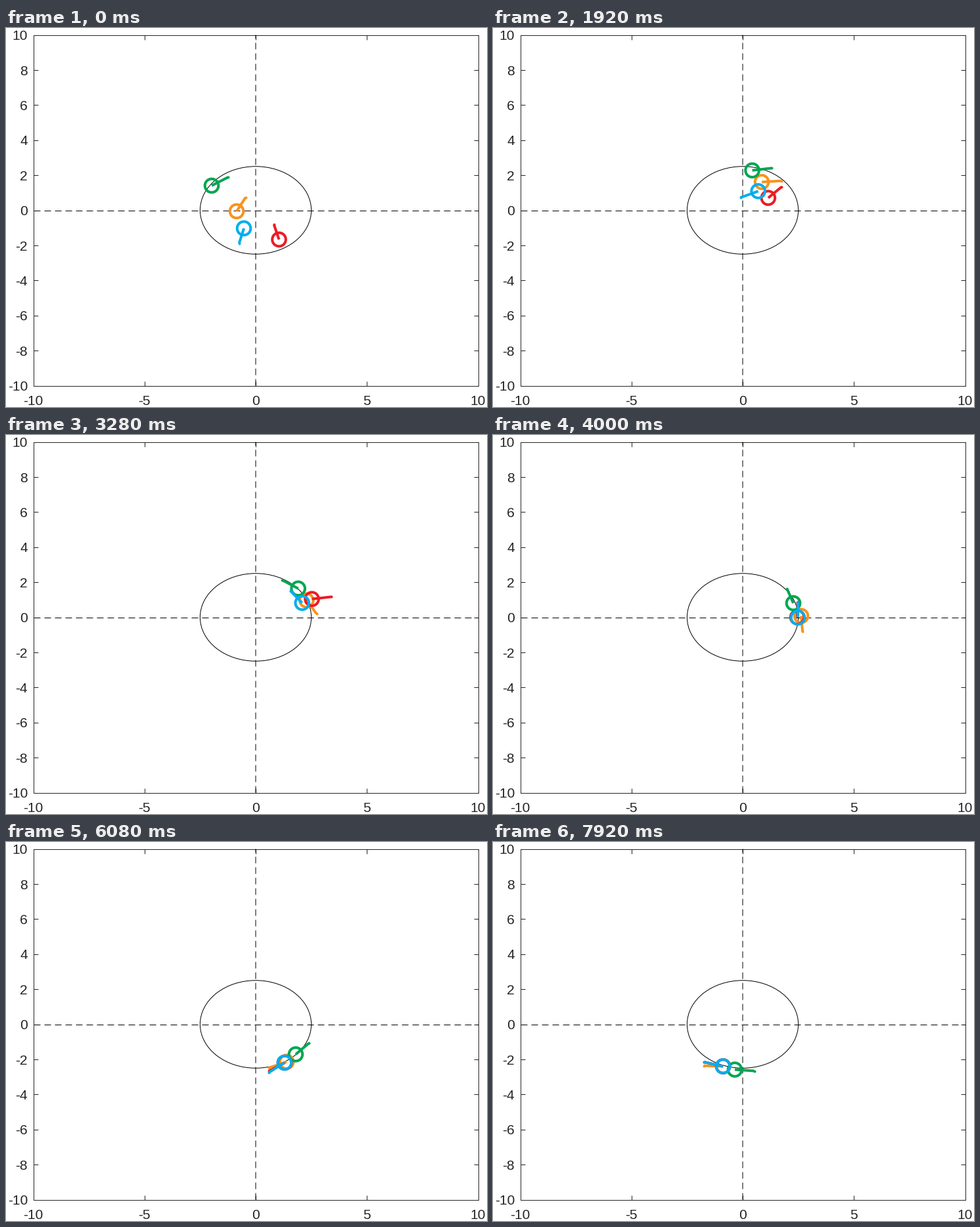
These frames come from a looping animation (732x577 px, 8000 ms). A matplotlib script:

```python
import numpy as np
import matplotlib.pyplot as plt
from matplotlib.animation import FuncAnimation
from matplotlib.patches import Circle, Ellipse, Rectangle

W, H, DPI = 732, 577, 64
PX = 72 / DPI  # points per pixel
FRAMES, INTERVAL = 100, 80
CX, CY, SX, SY = 380, 277.5, 33.85, 26.7  # plot origin and pixels per unit
INK = "#262626"
ARM = 0.88
TIMES = np.array([0, 1.2, 2.64, 4.0, 5.2, 6.96, 7.92])


def spline(times, values, t):
    """Cubic Hermite curve through the given points."""
    times, values = np.asarray(times, float), np.asarray(values, float)
    slopes = np.gradient(values, times, axis=0, edge_order=2)
    i = int(np.clip(np.searchsorted(times, t, side="right") - 1, 0, len(times) - 2))
    h = times[i + 1] - times[i]
    u = (t - times[i]) / h
    return ((2 * u**3 - 3 * u**2 + 1) * values[i]
            + (u**3 - 2 * u**2 + u) * h * slopes[i]
            + (3 * u**2 - 2 * u**3) * values[i + 1]
            + (u**3 - u**2) * h * slopes[i + 1])


def half_turn(t, start, length=0.5):
    u = np.clip((t - start) / length, 0, 1)
    return 180 * u * u * (3 - 2 * u)


class Robot:
    def __init__(self, ax, color, path, course, reverse, extra=None):
        """course: direction of travel in degrees; reverse: added turn over time."""
        keys = list(zip(TIMES, path)) + ([extra] if extra else [])
        keys.sort(key=lambda k: k[0])
        self.times = [k[0] for k in keys]
        self.path = [k[1] for k in keys]
        self.course, self.reverse = course, reverse
        self.body = Circle((0, 0), 10.3, fill=False, ec=color, lw=4 * PX, zorder=5)
        ax.add_patch(self.body)
        self.arm, = ax.plot([], [], color=color, lw=4 * PX, solid_capstyle="butt",
                            marker="o", ms=4 * PX, mew=0, markevery=[1], zorder=5)

    def move(self, t):
        x, y = spline(self.times, self.path, t)
        a = np.radians(spline(TIMES, self.course, t) + self.reverse(t))
        self.body.center = x, y
        self.arm.set_data([x, x + ARM * SX * np.cos(a)],
                          [y, y - ARM * SY * np.sin(a)])
        return self.body, self.arm


fig = plt.figure(figsize=(W / DPI, H / DPI), dpi=DPI, facecolor="white")
ax = fig.add_axes([0, 0, 1, 1])
ax.set(xlim=(0, W), ylim=(H, 0))
ax.axis("off")

left, right = CX - 10 * SX, CX + 10 * SX
top, bottom = CY - 10 * SY, CY + 10 * SY


def rule(xs, ys, **style):
    ax.plot(xs, ys, lw=PX, solid_capstyle="butt", dash_capstyle="butt",
            **{"color": INK, "zorder": 2, **style})


def label(x, y, value, align):
    ax.text(x, y, str(value), ha=align, va="baseline", color=INK,
            fontsize=21 * PX, family="Liberation Sans")


ax.add_patch(Rectangle((left, top), right - left, bottom - top,
                       fill=False, ec=INK, lw=PX, zorder=2))
for v in range(-10, 11, 5):
    x = CX + v * SX
    rule([x, x], [bottom, bottom - 7])
    rule([x, x], [top, top + 7])
    label(x, 574, v, "center")
for v in range(-10, 11, 2):
    y = CY - v * SY
    rule([left, left + 7], [y, y])
    rule([right, right - 7], [y, y])
    label(33, y + 7.7, v, "right")

dashes = (0, (10, 6))
rule([left, right], [CY, CY], color="black", ls=dashes)
rule([CX, CX], [bottom, top], color="black", ls=dashes, snap=False)
ax.add_patch(Ellipse((CX, CY), 5 * SX, 5 * SY, fill=False, ec="black", lw=PX, zorder=3))

robots = [
    Robot(ax, "#F7931D",
          [(351, 279), (379.5, 243), (438.5, 237), (469, 275.5),
           (455, 315), (391, 344.5), (350.5, 341.5)],
          [63, 38, -33, -86, -127, -178, -182],
          lambda t: 0),
    Robot(ax, "#ED1C24",
          [(415.5, 322), (406.5, 280.5), (441.5, 246), (463, 277.5),
           (449, 317.5), (391, 344.5), (350, 341.5)],
          [105, 83, 0, -91, -128, -179, -196],
          lambda t: half_turn(t, 3.1) - half_turn(t, 5.65),
          extra=(3.2, (464, 248))),
    Robot(ax, "#00A651",
          [(313, 240), (361, 221), (426, 220), (457, 256),
           (460, 297), (409.5, 341.5), (368, 346.5)],
          [33, 14.6, -4, -71, -107.6, -158, -185],
          lambda t: half_turn(t, 2.64),
          extra=(1.8, (389, 217))),
    Robot(ax, "#00AEEF",
          [(362, 305), (378.5, 264.5), (431, 243.5), (464, 278),
           (449, 317.5), (390.5, 344.5), (350, 341.5)],
          [76, 57.5, -16, -90, -128, -172, -196],
          lambda t: 180 - half_turn(t, 5.65)),
]


def draw(frame):
    t = frame * INTERVAL / 1000
    return [part for robot in robots for part in robot.move(t)]


anim = FuncAnimation(fig, draw, frames=FRAMES, interval=INTERVAL,
                     repeat=True, repeat_delay=0, blit=False)
plt.show()
```
